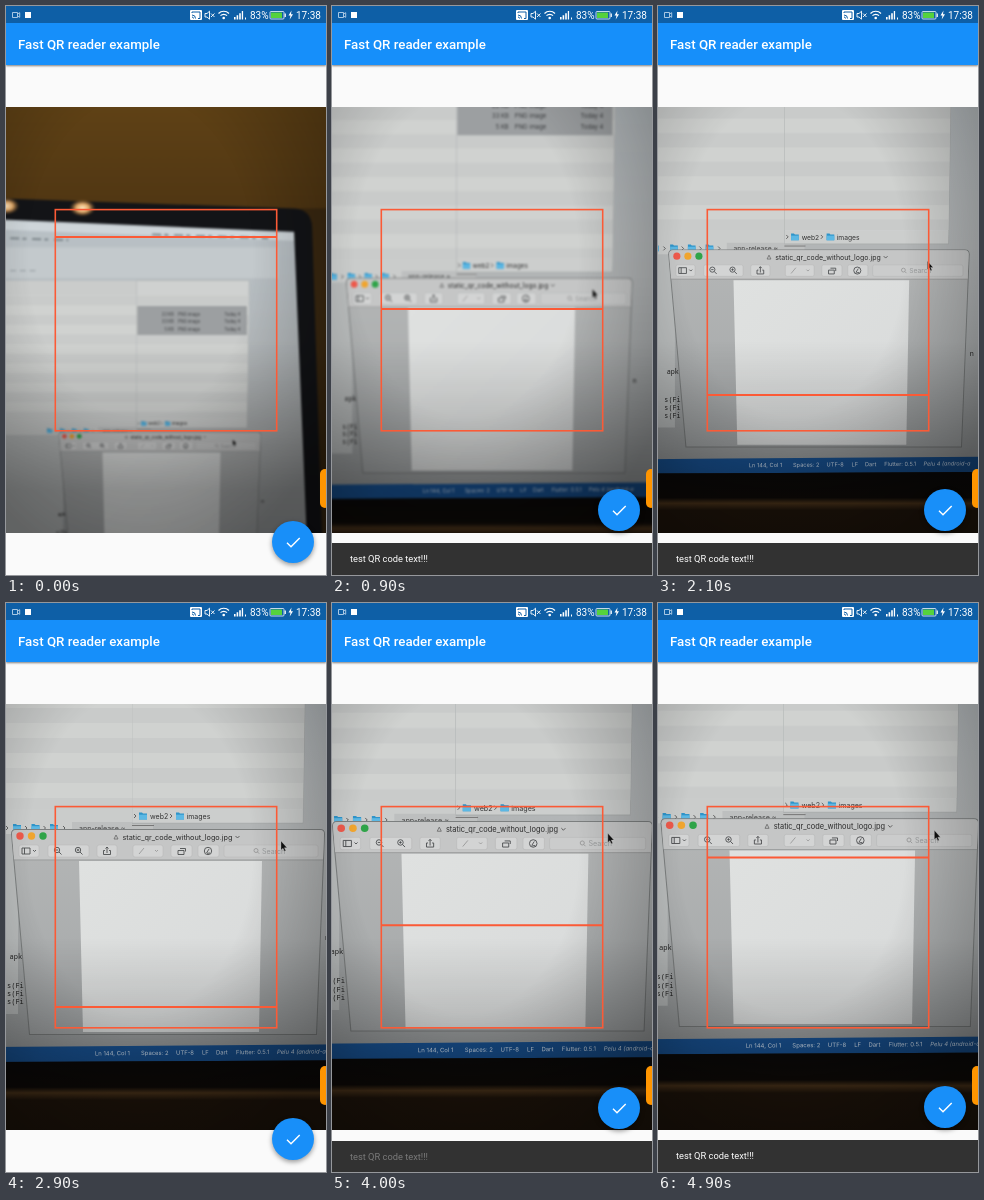
Animation of 320 by 569 pixels, one loop 5 s. Source, as an HTML page:

```html
<!DOCTYPE html>
<html lang="en">
<head>
<meta charset="utf-8">
<title>Fast QR reader example</title>
<style>
  html, body { margin: 0; width: 100%; height: 100%; overflow: hidden; background: #fafafa; }
  body { position: relative; font-family: Roboto, "Noto Sans", sans-serif; color: #fff; }
  body > *, .cam > * { position: absolute; }

  .status { left: 0; top: 0; width: 320px; height: 17px; background: #0e5fa6; }
  .bar {
    left: 0; top: 17px; width: 308px; height: 42px; padding-left: 12px;
    background: #168ffa; box-shadow: 0 1px 2px rgba(0,0,0,.5);
    font: 500 13.3px/43px Roboto, "Noto Sans", sans-serif; white-space: pre;
  }
  .cam { left: 0; top: 101px; width: 320px; height: 426px; overflow: hidden; background: #5d4016; }
  .scene {
    left: 0; top: -101px; width: 320px; height: 569px; overflow: visible;
    font-family: Inter, "Open Sans", sans-serif;
    animation: focus 5s infinite;
  }
  .view { transform-origin: 0 0; animation: aim 5s infinite; }
  .mono { font-family: "Noto Sans Mono", monospace; }
  .shade {
    inset: 0;
    background:
      linear-gradient(transparent 55%, rgba(0,0,0,.28) 90%),
      radial-gradient(ellipse 70% 75% at 42% 35%, transparent 50%, rgba(0,0,0,.27));
  }
  .target { left: 0; top: 0; width: 320px; height: 569px; }
  .line {
    left: 49px; top: -.8px; width: 222px; height: 1.6px; background: #fb5a36;
    animation: scan 5s infinite;
  }
  .tab { left: 314px; top: 462.5px; width: 10px; height: 39.5px; border-radius: 5px; background: #ff9500; }
  .fab {
    left: 266px; top: 515px; width: 42px; height: 42px; border-radius: 50%;
    background: #188ff9; box-shadow: 0 2px 5px rgba(0,0,0,.4);
  }
  .snack {
    left: 0; top: 569px; width: 302px; height: 32px; padding-left: 18px;
    background: #323232; font-size: 9.3px; line-height: 32px; white-space: pre;
  }
  .fab, .snack { animation: rise 5s step-end infinite; }
  .snack span { animation: show 5s step-end infinite; }

  /* the picture advances ten times a second */
  @keyframes aim {
    0%   { transform: translate(49.4px, 280px) scale(.645, .645); animation-timing-function: steps(5); }
    10%  { transform: translate(14px, 90px) scale(.885, .91);     animation-timing-function: steps(4); }
    18%  { transform: translate(9.4px, 57px) scale(.913, .95);    animation-timing-function: steps(12); }
    42%  { transform: translate(5.4px, 26px) scale(.96, .962);    animation-timing-function: steps(8); }
    58%  { transform: translate(0px, 0px) scale(1, 1);            animation-timing-function: steps(7); }
    72%  { transform: translate(-3.4px, -7.5px) scale(1.014, 1.014);  animation-timing-function: steps(8); }
    88%  { transform: translate(-6.8px, -18.2px) scale(1.029, 1.029); animation-timing-function: steps(5); }
    98%, 100% { transform: translate(-2.5px, -14px) scale(1.014, 1.014); animation-timing-function: step-end; }
  }
  @keyframes focus {
    0%  { filter: blur(1.3px); animation-timing-function: steps(9); }
    18% { filter: blur(.9px);  animation-timing-function: steps(6); }
    30%, 100% { filter: blur(0px); }
  }
  @keyframes scan {
    0%  { transform: translateY(231px); animation-timing-function: steps(9); }
    18% { transform: translateY(303px); animation-timing-function: steps(12); }
    42% { transform: translateY(389px); animation-timing-function: steps(5); }
    52% { transform: translateY(424px); animation-timing-function: steps(3); }
    58% { transform: translateY(404px); animation-timing-function: steps(7); }
    72% { transform: translateY(352px); animation-timing-function: steps(8); }
    88% { transform: translateY(292.5px); animation-timing-function: steps(5); }
    98%, 100% { transform: translateY(254.5px); animation-timing-function: step-end; }
  }
  @keyframes rise {
    0%, 52%, 100% { transform: none; }
    12%, 50%, 78% { transform: translateY(-18px); }
    14%, 80% { transform: translateY(-31px); }
    16%, 82% { transform: translateY(-32px); }
  }
  @keyframes show {
    0%, 50%, 100% { opacity: 0; }
    14%, 48%, 80% { opacity: .35; }
    16%, 82% { opacity: 1; }
  }
</style>
</head>
<body>
<div class="cam">
  <svg class="scene" viewBox="0 0 320 569">
    <defs>
      <linearGradient id="wall" x2="0" y2="1">
        <stop offset="0" stop-color="#6b4a18"/><stop offset="1" stop-color="#4a3212"/>
      </linearGradient>
      <linearGradient id="desk" x2="0" y2="1">
        <stop offset="0" stop-color="#b9c1c6"/><stop offset=".6" stop-color="#b2b5b6"/><stop offset="1" stop-color="#9a9d9e"/>
      </linearGradient>
      <linearGradient id="edge" x2="0" y2="1">
        <stop offset="0" stop-color="#0b0a0a"/><stop offset=".19" stop-color="#100c09"/>
        <stop offset=".23" stop-color="#543a1e"/><stop offset=".28" stop-color="#24180d"/><stop offset="1" stop-color="#1c130b"/>
      </linearGradient>
      <linearGradient id="blue">
        <stop offset="0" stop-color="#12406f"/><stop offset=".4" stop-color="#1a569a"/><stop offset="1" stop-color="#184e8b"/>
      </linearGradient>
      <linearGradient id="pane" x2="0" y2="1">
        <stop offset="0" stop-color="#b4b6b6"/><stop offset="1" stop-color="#a4a7a8"/>
      </linearGradient>
      <linearGradient id="paper" x2="1" y2="1">
        <stop offset="0" stop-color="#dfe1e0"/><stop offset="1" stop-color="#d8dada"/>
      </linearGradient>
      <radialGradient id="lamp">
        <stop offset="0" stop-color="#ffe9c4"/><stop offset=".5" stop-color="#e0a868"/><stop offset="1" stop-color="#a06a30" stop-opacity="0"/>
      </radialGradient>
      <pattern id="rows" width="40" height="30" patternUnits="userSpaceOnUse">
        <path fill="#d0d2d0" d="M0 0h40v30H0z"/><path fill="#c9cbca" d="M0 15h40v15H0z"/>
      </pattern>
      <g id="dir">
        <path fill="#2f94c9" d="M0 0h3l1 1h4v6H0z"/><path fill="#5cb8e4" d="M0 2.2h8V7H0z"/>
      </g>
      <path id="gt" d="M0 0l2 2-2 2" fill="none" stroke="#444" stroke-width=".8"/>
    </defs>

    <g class="view">
      <!-- wall and laptop -->
      <path fill="url(#wall)" d="M-200-400H600V-60H-200z"/>
      <path fill="#3b2911" d="M380-120H600V600H380z"/>
      <path fill="#131417" d="M-200-140L372-120Q396-118 398-92L420 600H-200z"/>
      <ellipse cx="42" cy="-121" rx="20" ry="13" fill="url(#lamp)"/>
      <ellipse cx="-76" cy="-124" rx="20" ry="13" fill="url(#lamp)"/>
      <path fill="url(#desk)" d="M-200-108L370-84 392 445H-200z"/>
      <path fill="#ced5d9" d="M-200-106L370-82V-70L-200-92z"/>
      <path stroke="#7f888d" stroke-width="3" stroke-dasharray="14 5 6 9" d="M-70-74L20-71M150-80L330-74" fill="none"/>
      <path fill="#c3c9cc" d="M-200-60H345V-12H-200z"/>
      <path stroke="#9ba3a7" stroke-width="2" stroke-dasharray="9 6" d="M-70-24H-30" fill="none"/>

      <!-- editor behind the windows -->
      <path fill="#b9bcbc" d="M-200 228H12V411H-200z"/>
      <g class="mono" font-size="7" fill="#222">
        <text x="3.5" y="356">apk</text>
        <text x="1" y="385">s(Fi</text><text x="1" y="393">s(Fi</text><text x="1" y="401">s(Fi</text>
        <text x="319" y="337">n</text>
      </g>

      <!-- file windows -->
      <path fill="#cacccb" d="M-200-8H126V231H-200z"/>
      <path fill="url(#rows)" d="M-200 14H126V206H-200z"/>
      <path fill="#bdbfbf" d="M66 219H147V230H66z"/>
      <path stroke="#777" d="M126 222.5H148"/>
      <use href="#dir" x="-13" y="221"/><use href="#dir" x="7" y="221"/><use href="#dir" x="25.5" y="221"/><use href="#dir" x="44" y="221"/>
      <use href="#gt" x="0" y="223"/><use href="#gt" x="19" y="223"/><use href="#gt" x="37.5" y="223"/><use href="#gt" x="57" y="223"/>
      <text x="73" y="227.5" font-size="7" fill="#444">app-release ≈</text>
      <path fill="#adb0b0" d="M126-9H301L297.5 221H126z"/>
      <path fill="#cfd1d0" d="M126.5-8H300L296.5 219.5H126.5z"/>
      <path fill="url(#rows)" d="M126.5 14H300L297 206H126.5z"/>
      <path fill="#9c9fa1" d="M127 31H297V76H127z"/>
      <g font-size="6.5" fill="#3a3c3e">
        <text x="165" y="47">22 KB</text><text x="190" y="47">PNG image</text><text x="262" y="47">Today 4</text>
        <text x="165" y="58">33 KB</text><text x="190" y="58">PNG image</text><text x="262" y="58">Today 4</text>
        <text x="169" y="70">5 KB</text><text x="190" y="70">PNG image</text><text x="262" y="70">Today 4</text>
      </g>
      <path fill="#cccecd" d="M126.5 206.5H296.8L296.5 219.5H126.5z"/>
      <use href="#gt" x="128" y="211"/><use href="#dir" x="133" y="209.5"/>
      <use href="#gt" x="164" y="211"/><use href="#dir" x="170" y="209.5"/>
      <g font-size="7" fill="#333"><text x="144" y="215.8">web2</text><text x="180.5" y="215.8">images</text></g>

      <!-- preview window -->
      <path fill="#7c7f7f" d="M5 231Q5 226 10 226H314Q319 226 319 231L311 432H23z"/>
      <path fill="url(#pane)" d="M6 231Q6 227 10 227H314Q318 227 318 231L310 431H24z"/>
      <path fill="#c5c6c6" d="M6 231Q6 227 10 227H314Q318 227 318 231L317 256.500H8z"/>
      <path stroke="#989a9a" stroke-width=".8" d="M8 257H317"/>
      <path fill="url(#paper)" d="M73 258H256L253 429H77z"/>
      <circle cx="14" cy="233" r="3.7" fill="#ee5a4c"/>
      <circle cx="25.5" cy="233" r="3.7" fill="#f0a52f"/>
      <circle cx="37" cy="233" r="3.7" fill="#2fa449"/>
      <path d="M108 236l2-4 2 4z" fill="none" stroke="#666" stroke-width=".8"/>
      <text x="116.5" y="236.5" font-size="7.3" fill="#2c2c2c">static_qr_code_without_logo.jpg</text>
      <path d="M229.5 233l2 2 2-2" fill="none" stroke="#444" stroke-width=".8"/>
      <g fill="#d3d4d4" stroke="#b4b5b5" stroke-width=".5">
        <rect x="13" y="242" width="20" height="12" rx="2"/><rect x="42" y="242" width="41" height="12" rx="2"/>
        <rect x="91" y="242" width="20" height="12" rx="2"/><rect x="127" y="242" width="30" height="12" rx="2"/>
        <rect x="165" y="242" width="21" height="12" rx="2"/><rect x="192" y="242" width="21" height="12" rx="2"/>
        <rect x="218" y="242" width="94" height="12" rx="2" fill="#cbcccc"/>
      </g>
      <g fill="none" stroke="#4c4e50" stroke-width=".9">
        <path d="M16 245h8v6h-8zM18.500 245v6M27 247l1.500 1.500L30 247"/>
        <circle cx="51" cy="247" r="2.7"/><path d="M53 249l2.500 2.500M49.800 247h2.400"/>
        <circle cx="72" cy="247" r="2.7"/><path d="M74 249l2.500 2.500M70.800 247h2.400M72 245.800v2.400"/>
        <path d="M99 247.500h-1.500v4h7v-4H103M101 250v-6M99.500 245.500l1.500-1.500 1.500 1.500"/>
        <path d="M172 247.500h6v4h-6zM174 245.500h5.500v3"/>
        <circle cx="202" cy="248" r="3.7"/><path d="M200.500 250l2.500-4M201 250.300l3-.3"/>
        <path stroke="#999" d="M133 251l5-6M149 247l1.500 1.500 1.500-1.500"/>
        <circle cx="250" cy="247.5" r="2" stroke="#999"/><path stroke="#999" d="M251.500 249l1.700 1.700"/>
      </g>
      <text x="256" y="250.6" font-size="7" fill="#999b9c">Search</text>
      <path fill="#111" stroke="#ddd" stroke-width=".3" d="M275 238v9l2-1.700 1.500 3 1.300-.6-1.400-3h2.600z"/>

      <!-- bottom of the screen -->
      <path fill="url(#blue)" d="M-200 445L-20 444 393 441V457L-20 459-200 460z"/>
      <path fill="url(#edge)" d="M-200 460L-20 459 393 457 430 600H-200z"/>
      <g font-size="5.9" fill="#e2effc" transform="rotate(-.5 89 452.5)">
        <text x="89" y="452.5">Ln 144, Col 1</text><text x="135" y="452.5">Spaces: 2</text>
        <text x="170" y="452.5">UTF-8</text><text x="196" y="452.5">LF</text><text x="210" y="452.5">Dart</text>
        <text x="230" y="452.5">Flutter: 0.5.1</text><text x="271" y="452.5" font-style="italic">Pelu 4 (android-a</text>
      </g>
    </g>
  </svg>
  <div class="shade"></div>
</div>

<svg class="target" viewBox="0 0 320 569">
  <rect x="49.3" y="203.6" width="221.4" height="221.2" fill="none" stroke="#fb5a36" stroke-width="1.6"/>
</svg>
<div class="line"></div>
<div class="tab"></div>

<div class="bar">Fast QR reader example</div>
<svg class="status" viewBox="0 0 320 17" font-family="Roboto, sans-serif" font-size="10" fill="#fff">
  <path d="M6.500 6.500h5v5h-5zM11.500 8l2.200-1.300v4.600L11.500 10" fill="none" stroke="#b9d3ea" stroke-width=".9"/>
  <rect x="19" y="6" width="6" height="6"/>
  <rect x="184" y="4" width="12" height="10" rx="1"/>
  <path d="M186 7V6h8v6.500h-2M186 9a3.500 3.500 0 0 1 3.500 3.500M186 11a1.500 1.500 0 0 1 1.500 1.500" fill="none" stroke="#0e5fa6"/>
  <path d="M199 7.500h2l2.500-2.300v8L201 11h-2zM205 7.500l3.500 3.500M208.500 7.500L205 11" fill="none" stroke="#fff" stroke-width=".9"/>
  <path d="M212.500 7.500a7.200 7.200 0 0 1 10.500 0M214.500 9.700a4.500 4.500 0 0 1 6.500 0" fill="none" stroke="#fff" stroke-width="1.2"/>
  <circle cx="217.7" cy="12" r="1.3"/>
  <path d="M228 11h1.600v2.500H228zM230.600 9.300h1.600v4.200h-1.600zM233.200 7.300h1.600v6.200h-1.600zM235.800 5h1.300v8.500h-1.300zM239 11.500h1v2h-1z"/>
  <text x="244" y="12.6">83%</text>
  <rect x="264" y="5.5" width="14" height="7.5" rx="1" fill="none" stroke="#d8e6f2" stroke-width=".9"/>
  <rect x="265" y="6.5" width="11" height="5.5" fill="#55d23c"/>
  <path d="M278.500 7.500h1.500v3.500h-1.500z" fill="#d8e6f2"/>
  <path d="M285.500 4.500l-3 5h2l-.8 4 3.300-5.200h-2z"/>
  <text x="290" y="12.6">17:38</text>
</svg>

<svg class="fab" viewBox="0 0 42 42">
  <path d="M15 21.800l4 4 8.700-8.900" fill="none" stroke="#fff" stroke-width="1.4"/>
</svg>
<div class="snack"><span>test QR code text!!!</span></div>
</body>
</html>
```
